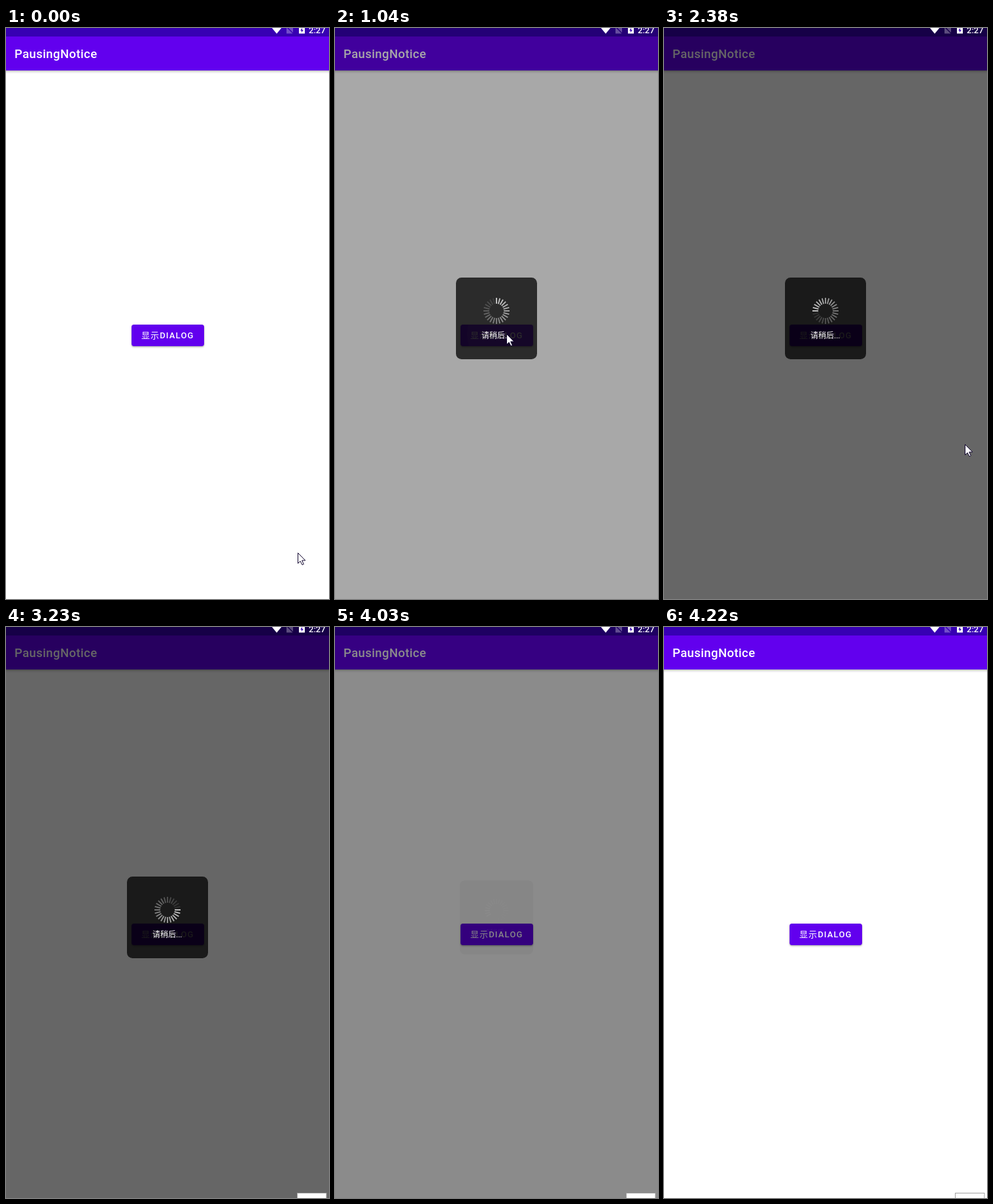
An HTML page with a canvas that plays this animation: 494 by 874 pixels, repeating every 4540 ms.

```html
<!DOCTYPE html>
<html lang="zh-CN">
<head>
<meta charset="utf-8">
<title>Waiting panel</title>
<style>
  html, body { margin: 0; width: 100%; height: 100%; overflow: hidden; background: #fff; }
  canvas { display: block; }
</style>
</head>
<body>
<canvas id="stage" width="494" height="874"></canvas>
<script>
const W = 494, H = 874, LOOP = 4540;
const PRESS = 760, SHOW = 990, TIP = 2950, HIDE = 4030;
const HOLD = 47.5;      // the picture is refreshed at this interval
const SPIN = 150.8;     // time per spinner step
const ctx = document.getElementById('stage').getContext('2d');
const LATIN = 'Roboto, "Noto Sans CJK SC", "Noto Sans CJK", sans-serif';
const CJK = '"Noto Sans CJK SC", "Noto Sans CJK", sans-serif';

// Pointer legs: quadratic curves, eased at both ends
const LEGS = [
  { start: 0, end: 580, from: [446, 803], bend: [354, 635], to: [262, 468] },
  { start: 1512.5, end: 2015, from: [262, 468], bend: [300, 534], to: [434, 260] },
  { start: 2052.5, end: 2530, from: [434, 260], bend: [438, 560], to: [492, 838] }
];
const GONE = 2520;

const ramp = (t, a, b) => Math.max(0, Math.min(1, (t - a) / (b - a)));
const smooth = u => u * u * (3 - 2 * u);
const held = (t, start) => start + Math.floor((t - start) / HOLD) * HOLD;
const white = a => `rgba(255,255,255,${a})`;
const black = a => `rgba(0,0,0,${a})`;

function text(str, x, y, font, spacing = 0) {
  ctx.font = font;
  ctx.letterSpacing = spacing + 'px';
  ctx.fillStyle = '#fff';
  ctx.fillText(str, x, y);
}

function poly(fill, ...p) {
  ctx.beginPath();
  for (let i = 0; i < p.length; i += 2) ctx.lineTo(p[i], p[i + 1]);
  ctx.closePath();
  ctx.fillStyle = fill;
  ctx.fill();
}

function rounded(x, y, w, h, r) {
  ctx.beginPath();
  ctx.roundRect(x, y, w, h, r);
}

function drawBars() {
  ctx.fillStyle = '#fff';
  ctx.fillRect(0, 0, W, H);
  const shade = ctx.createLinearGradient(0, 65, 0, 70);
  shade.addColorStop(0, black(.26));
  shade.addColorStop(.5, black(.08));
  shade.addColorStop(1, black(0));
  ctx.fillStyle = shade;
  ctx.fillRect(0, 65, W, 5);
  ctx.fillStyle = '#6200ee';
  ctx.fillRect(0, 13, W, 52);
  ctx.fillStyle = '#3700b3';
  ctx.fillRect(0, 0, W, 13);
  text('PausingNotice', 13, 46, '500 18.6px ' + LATIN, .35);
}

function drawStatus() {
  poly('#fff', 406.8, 0, 421.2, 0, 414, 8.7);
  poly(white(.3), 432, 0, 439, 0, 439, 7);
  poly(white(.3), 429, 0, 430, 0, 438.5, 8.5, 429, 8.5);
  ctx.fillStyle = '#fff';
  ctx.fillRect(448, 0, 9, 8.5);
  poly('#3700b3', 453, 0, 450.3, 4, 452, 4, 451.8, 7, 454.8, 3, 453, 3);
  text('2:27', 463, 8, '500 13px ' + LATIN);
}

function drawButton(t) {
  const age = held(t, PRESS) - PRESS;
  const pressed = t >= PRESS && t < SHOW;
  const lift = pressed ? ramp(age, -HOLD, 2 * HOLD) : 0;
  const glow = t < PRESS ? 0 : 1 - .6 * ramp(t, 950, 1040) - .4 * ramp(t, 1040, 1090);
  ctx.save();
  ctx.shadowColor = black(.34);
  ctx.shadowBlur = 2.5 + 6 * lift;
  ctx.shadowOffsetY = 1.3 + 5 * lift;
  ctx.fillStyle = '#6200ee';
  rounded(192, 454, 111, 33, 3.7);
  ctx.fill();
  ctx.restore();
  if (glow > 0) {
    ctx.save();
    rounded(192, 454, 111, 33, 3.7);
    ctx.clip();
    ctx.fillStyle = white(.21 * glow);
    ctx.fillRect(192, 454, 111, 33);
    ctx.beginPath();
    ctx.arc(260, 469, 14 + age * .186, 0, 7);
    ctx.fill();
    ctx.restore();
  }
  text('显示', 206.9, 475, '400 13px ' + CJK, 1.16);
  text('DIALOG', 235.2, 475, '500 13px ' + LATIN, 1.16);
}

function drawDim(t) {
  const shown = ramp(held(t, SHOW), 975, 1085);
  const hidden = t < HIDE ? 0 : ramp(held(t, HIDE), 3970, 4220);
  ctx.fillStyle = black(.6 * shown * (1 - hidden));
  ctx.fillRect(0, 0, W, H);
}

function drawSpinner(t) {
  ctx.save();
  ctx.translate(247, 433);
  ctx.rotate(Math.floor((t - 967) / SPIN) * Math.PI / 6);
  for (let i = 0; i < 24; i++) {
    ctx.fillStyle = white(.78 - .68 * i / 23);
    ctx.fillRect(-.9, -20, 1.8, 9);
    ctx.rotate(Math.PI / 12);
  }
  ctx.restore();
}

function drawDialog(t) {
  const closing = t < HIDE ? 0 : ramp(held(t, HIDE), 3840, 4041);
  const open = ramp(held(t, SHOW), 950, 1030) * (1 - closing);
  if (!open) return;
  const scale = .9 + .1 * open;
  ctx.save();
  ctx.globalAlpha = open;
  ctx.translate(247, 444.5);
  ctx.scale(scale, scale);
  ctx.translate(-247, -444.5);
  ctx.fillStyle = black(.745);
  rounded(185, 382, 124, 125, 8.5);
  ctx.fill();
  drawSpinner(t);
  text('请稍后...', 224, 475, '400 12px ' + LATIN);
  ctx.restore();
}

function drawTip(t) {
  if (t < TIP) return;
  ctx.save();
  ctx.globalAlpha = ramp(held(t, TIP), TIP - HOLD, TIP + 3 * HOLD);
  ctx.fillStyle = '#fff';
  ctx.strokeStyle = '#a0a0a0';
  ctx.lineWidth = 1;
  ctx.fillRect(445, 866, 45, 12);
  ctx.strokeRect(445.5, 866.5, 44.5, 12);
  ctx.restore();
}

function pointerAt(t) {
  const { start, end, from, bend, to } = LEGS.filter(leg => leg.start <= t).pop();
  const u = smooth(ramp(held(t, start), start, end)), v = 1 - u;
  return from.map((p, i) => Math.round(v * v * p + 2 * u * v * bend[i] + u * u * to[i]));
}

function drawPointer(t) {
  if (t >= GONE) return;
  const [x, y] = pointerAt(t);
  ctx.save();
  ctx.translate(x + .5, y + .5);
  poly('#fff', 0, 0, 0, 16, 3.6, 12.6, 6.5, 18.2, 8.8, 17.2, 6.2, 11.5, 11.3, 11.5);
  ctx.strokeStyle = '#10052e';
  ctx.lineWidth = 1;
  ctx.stroke();
  ctx.restore();
}

function draw(t) {
  drawBars();
  drawButton(t);
  drawDim(t);
  drawStatus();
  drawDialog(t);
  drawTip(t);
  drawPointer(t);
}

const begin = performance.now();
function tick() {
  draw((performance.now() - begin) % LOOP);
  requestAnimationFrame(tick);
}
tick();
</script>
</body>
</html>
```
